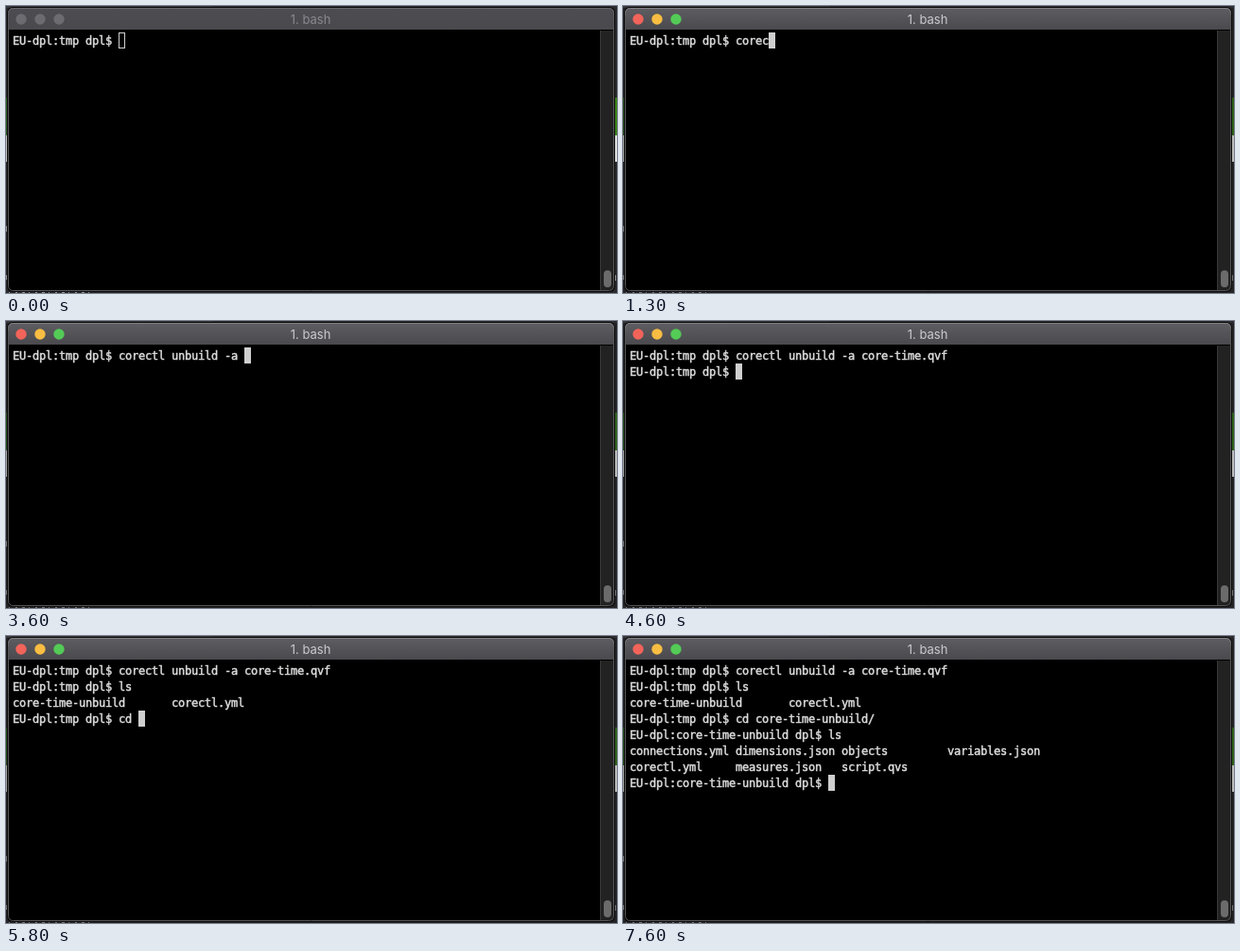
These frames come from a looping animation (646x304 px, 8 s). An HTML page with a canvas:

```html
<!DOCTYPE html>
<html lang="en">
<head>
<meta charset="utf-8">
<title>Terminal</title>
<style>
  html, body { margin: 0; width: 100%; height: 100%; overflow: hidden; background: #252528; }
  canvas { display: block; width: 646px; height: 304px; }
</style>
</head>
<body>
<canvas id="stage"></canvas>
<script>
const W = 646, H = 304, LOOP = 8000;
const CELL = 7, LINE = 17, LEFT = 7, TOP = 28;
const FOCUS_AT = 100;

const canvas = document.getElementById('stage');
const ctx = canvas.getContext('2d');
const scale = window.devicePixelRatio || 1;
canvas.width = W * scale;
canvas.height = H * scale;

const prompt = dir => `EU-dpl:${dir} dpl$ `;
const columns = (width, ...names) => names.map(n => n.padEnd(width)).join('').trimEnd() + '\n';

// Each entry appends text to the session at the given time.
const session = [
  [0, prompt('tmp')],
  [900, 'co'], [1100, 'r'], [1200, 'e'], [1300, 'c'], [1500, 'tl '],
  [2100, 'u'], [2200, 'n'], [2300, 'b'], [2500, 'uil'], [2600, 'd '],
  [3200, '-'], [3400, 'a'], [3600, ' '], [3800, 'core-time.qvf '],
  [4100, '\n'], [4200, prompt('tmp')],
  [5000, 'l'], [5100, 's'],
  [5200, '\n' + columns(24, 'core-time-unbuild', 'corectl.yml') + prompt('tmp')],
  [5600, 'c'], [5700, 'd'], [5800, ' '],
  [6000, 'c'], [6100, 'o'], [6200, 're-time-unbuild/'],
  [6800, '\n' + prompt('core-time-unbuild')],
  [7500, 'ls'],
  [7600, '\n' + columns(16, 'connections.yml', 'dimensions.json', 'objects', 'variables.json')
    + columns(16, 'corectl.yml', 'measures.json', 'script.qvs')
    + prompt('core-time-unbuild')]
];

function rect(x, y, w, h, color) {
  ctx.fillStyle = color;
  ctx.fillRect(x, y, w, h);
}

function roundPath(x, y, w, h, r) {
  ctx.beginPath();
  ctx.moveTo(x + r, y);
  ctx.arcTo(x + w, y, x + w, y + h, r);
  ctx.arcTo(x + w, y + h, x, y + h, r);
  ctx.arcTo(x, y + h, x, y, r);
  ctx.arcTo(x, y, x + w, y, r);
  ctx.closePath();
}

function drawDesktop(active) {
  rect(0, 0, W, H, active ? '#242427' : '#29292c');
  rect(0, 0, 218, 2, '#37363b');
  rect(218, 0, W - 218, 2, '#2d2c31');
  rect(0, 97, 2, 40, active ? '#28501f' : '#2d6121');
  rect(643, 97, 3, 40, active ? '#2d611b' : '#398314');
  rect(0, 137, 2, 28, active ? '#a5a5a5' : '#c5c5c5');
  rect(643, 137, 3, 28, active ? '#bcbcbc' : '#e2e2e2');
  // Slivers of the page behind the window
  const ink = active ? '#77777a' : '#98989b';
  rect(0, 233, 1, 6, ink);
  rect(0, 285, 1, 5, ink);
  rect(644, 285, 1, 6, ink);
  for (let x = 3; x < 92; x += 7) rect(x, 303, x % 3 + 1, 1, ink);
}

function drawWindow(active) {
  // Dark outline, then a light rim inside it
  ctx.fillStyle = '#0c0c0d';
  roundPath(1, 1, 643, 302, 6);
  ctx.fill();

  ctx.save();
  roundPath(2, 2, 641, 300, 5);
  ctx.clip();
  rect(2, 2, 641, 300, '#000');

  const bar = ctx.createLinearGradient(0, 2, 0, 25);
  bar.addColorStop(0, active ? '#5e5d62' : '#4d4c51');
  bar.addColorStop(1, '#4a494e');
  rect(2, 2, 641, 23, bar);

  rect(628, 26, 14, 275, '#222');
  rect(628, 26, 1, 275, '#393939');
  ctx.fillStyle = '#6b6b6b';
  roundPath(632, 280, 8, 18, 4);
  ctx.fill();
  ctx.restore();

  const rim = ctx.createLinearGradient(0, 2, 0, 12);
  rim.addColorStop(0, active ? '#858489' : '#69686d');
  rim.addColorStop(1, '#565659');
  ctx.strokeStyle = rim;
  ctx.lineWidth = 1;
  roundPath(2.5, 2.5, 640, 299, 5);
  ctx.stroke();

  ['#f2645a', '#f8bd42', '#53cb56'].forEach((color, i) => {
    ctx.fillStyle = active ? color : '#6c6b70';
    ctx.beginPath();
    ctx.arc(16 + 20 * i, 14, 5.7, 0, Math.PI * 2);
    ctx.fill();
  });

  ctx.font = '13px Inter, sans-serif';
  ctx.textAlign = 'center';
  ctx.fillStyle = active ? '#cccbcf' : '#89888d';
  ctx.fillText('1. bash', 322, 19);
}

function drawText(text, active) {
  ctx.font = '12px "DejaVu Sans Mono", monospace';
  ctx.textAlign = 'left';
  ctx.fillStyle = ctx.strokeStyle = '#dedede';
  ctx.lineWidth = 0.45;

  const rows = text.split('\n');
  rows.forEach((row, r) => {
    [...row].forEach((ch, c) => {
      if (ch === ' ') return;
      const x = LEFT + c * CELL, y = TOP + 13 + r * LINE;
      ctx.fillText(ch, x, y);
      ctx.strokeText(ch, x, y);
    });
  });

  const last = rows.length - 1;
  const x = LEFT + rows[last].length * CELL, y = TOP + last * LINE;
  if (active) {
    rect(x, y, CELL, LINE, '#cfcfcf');
  } else {
    ctx.strokeStyle = '#d0d0d0';
    ctx.lineWidth = 1;
    ctx.strokeRect(x + 0.5, y + 0.5, CELL - 1, LINE - 1);
  }
}

function draw(t) {
  const active = t >= FOCUS_AT;
  const text = session.filter(([at]) => at <= t).map(([, s]) => s).join('');
  ctx.setTransform(scale, 0, 0, scale, 0, 0);
  drawDesktop(active);
  drawWindow(active);
  drawText(text, active);
}

const start = performance.now();
function tick() {
  draw((performance.now() - start) % LOOP);
  requestAnimationFrame(tick);
}
tick();
</script>
</body>
</html>
```
